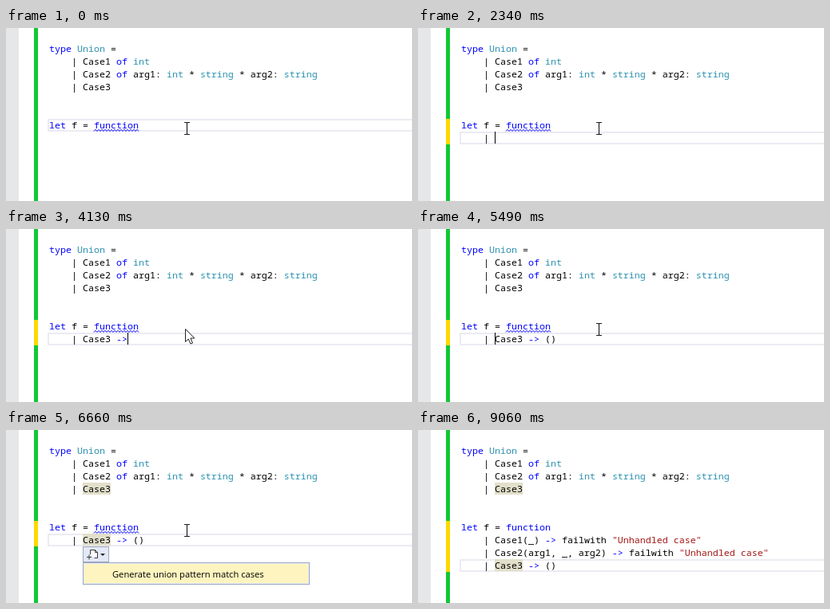
An HTML page that plays this animation: 508x217 px, repeating every 9170 ms.

```html
<!DOCTYPE html>
<html lang="en">
<head>
<meta charset="utf-8">
<title>Union pattern match cases</title>
<style>
  html, body { margin: 0; width: 100%; height: 100%; overflow: hidden; background: #fff; }
  svg { display: block; }
  text { white-space: pre; font: 11.667px "Noto Sans Mono", "DejaVu Sans Mono", monospace; }
  .key { fill: #0000ff; }
  .type { fill: #2b91af; }
  .str { fill: #a31515; }
  .menu { font: 11.17px "Open Sans", "Noto Sans", sans-serif; }
</style>
</head>
<body>
<svg id="stage" width="508" height="217" viewBox="0 0 508 217"></svg>
<script>
const LOOP = 9170, LEFT = 54, CHAR = 7, LINE = 16, TOP = 18, FIRST = 7;
const stage = document.getElementById("stage");
const header = ["type Union =", "    | Case1 of int",
  "    | Case2 of arg1: int * string * arg2: string", "    | Case3", "", "", "let f = function"];
const generated = ['    | Case1(_) -> failwith "Unhandled case"',
  '    | Case2(arg1, _, arg2) -> failwith "Unhandled case"'];

// Each step changes only the listed parts of the editor state.
const steps = [
  [0, { body: [], row: 6, caret: -1, marks: false, braces: false, tag: false,
        squiggle: true, pointer: "beam", x: 226, y: 126, popup: 0 }],
  [530, { caret: 16 }],
  [960, { body: [""], row: 7, caret: 0 }],
  [1360, { caret: 4 }],
  [1660, { caret: -1 }],
  [2190, { body: ["    |"], caret: 5 }],
  [2340, { caret: 6 }],
  [2610, { body: ["    | C"], caret: -1 }],
  [2890, { body: ["    | Ca"], caret: 8, pointer: "arrow" }],
  [3010, { body: ["    | Case"], caret: 10 }],
  [3160, { body: ["    | Case3"], caret: -1 }],
  [3280, { caret: 11 }],
  [3560, { marks: true }],
  [3710, { caret: 12 }],
  [3830, { body: ["    | Case3 -"], caret: 13 }],
  [4130, { body: ["    | Case3 ->"], caret: 14, marks: false }],
  [4540, { caret: 15 }],
  [4660, { body: ["    | Case3 -> ()"], caret: -1 }],
  [4810, { caret: 17 }],
  [4940, { pointer: "beam" }],
  [5090, { caret: 16 }],
  [5220, { caret: 15, braces: true }],
  [5370, { caret: 12, braces: false }],
  [5490, { caret: 6 }],
  [5770, { marks: true, tag: true, pointer: "arrow" }],
  [6390, { caret: -1 }],
  [6540, { popup: 1, tag: false, pointer: "beam" }],
  [6660, { popup: 2 }],
  [6780, { body: [...generated, "    | Case3 -> ()"], row: 9, caret: 6, popup: 0, tag: true }],
  [7030, { tag: false }],
  [7310, { caret: -1 }],
  [7870, { caret: 6 }],
  [8300, { squiggle: false, x: 234, y: 130 }],
  [8420, { caret: -1, x: 285, y: 155 }],
  [8540, { x: 345, y: 184 }],
  [8660, { x: 386, y: 202 }],
  [8780, { caret: 6, pointer: "" }],
  [9060, { caret: -1 }]
];

const rect = (x, y, w, h, fill, extra = "") =>
  `<rect x="${x}" y="${y}" width="${w}" height="${h}" fill="${fill}" ${extra}/>`;
const frame = (x, y, w, h, fill, stroke) =>
  rect(x + .5, y + .5, w - 1, h - 1, fill, `stroke="${stroke}"`);
const path = (d, stroke, fill = "none", width = 1) =>
  `<path d="${d}" stroke="${stroke}" fill="${fill}" stroke-width="${width}"/>`;
const colX = col => LEFT + CHAR * col;
const rowY = row => TOP + LINE * row;

function paint(code) {
  return code.replace(/("[^"]*")|\b(type|of|let|function)\b|->|\b(Union|int|string)\b/g,
    (word, str, key, type) =>
      `<tspan class="${str ? "str" : type ? "type" : "key"}">${word.replace(">", "&gt;")}</tspan>`);
}

function squiggle() {
  let d = "M110 129.5";
  for (let x = 112; x <= 166; x += 2) d += `L${x} ${x % 4 ? 129.5 : 127.3}`;
  return path(d, "#0000ff");
}

function pointer(s) {
  if (s.pointer == "beam") {
    return path(`M${s.x - 3} ${s.y - 7.5}h3l.5 1 .5-1h3m-3.5 1v13m-3.5 1h3l.5-1 .5 1h3`, "#222", "none", 1.2);
  }
  return s.pointer && path("M224.5 125.5v16l3.7-3.5 2.8 6 2.5-1-2.6-6h5z", "#222", "#fff");
}

function popup(level) {
  let out = "";
  if (level > 0) {
    out += frame(96, 146, 33, 20, "#e3e9f5", "#9ba7c1")
      + path("M105.5 156v-5.500h6l3 3v7h-4", "#3b3b3b", "#fff")
      + path("M101 159.500h6m-3-3v6M111.500 150.500v3h3", "#3b3b3b")
      + path("M118 155h6l-3 3z", "none", "#222");
  }
  if (level > 1) {
    out += frame(96, 166, 284, 28, "#e9edf6", "#9ba7c1")
      + rect(98, 168, 280, 24, "#fdf4bf")
      + '<text class="menu" x="133" y="185">Generate union pattern match cases</text>';
  }
  return out;
}

function draw(s) {
  const y = rowY(s.row), n = s.body.length;
  const mark = row => rect(colX(6), rowY(row), 35, 15, "#e2dfca");
  let out = rect(0, 0, 16, 217, "#e6e7e8") + rect(35, 0, 5, 217, "#10c835");
  if (n) out += rect(35, 114, 5, LINE * (n + 1), "#ffd800");
  out += rect(53, y + 1, 470, 14, "none", 'stroke="#e6e6f0" stroke-width="1.6"');
  if (s.marks) out += mark(3) + mark(s.row);
  if (s.braces) out += rect(colX(15), y, 14, 15, "#dbe0cc");
  [...header, ...s.body].forEach((code, row) => {
    out += `<text x="${LEFT}" y="${rowY(row) + 12}">${paint(code)}</text>`;
  });
  if (s.squiggle) out += squiggle();
  if (s.tag) out += frame(96, y + 15, 8, 3, "#fff", "#33335a");
  if (s.caret >= 0) out += rect(colX(s.caret), y, 1, 15, "#000");
  stage.innerHTML = out + popup(s.popup) + pointer(s);
}

let shown = -1;
function tick() {
  const t = performance.now() % LOOP;
  const past = steps.filter(([at]) => at <= t);
  if (past.length != shown) {
    shown = past.length;
    draw(Object.assign({}, ...past.map(([, change]) => change)));
  }
  requestAnimationFrame(tick);
}
tick();
</script>
</body>
</html>
```
